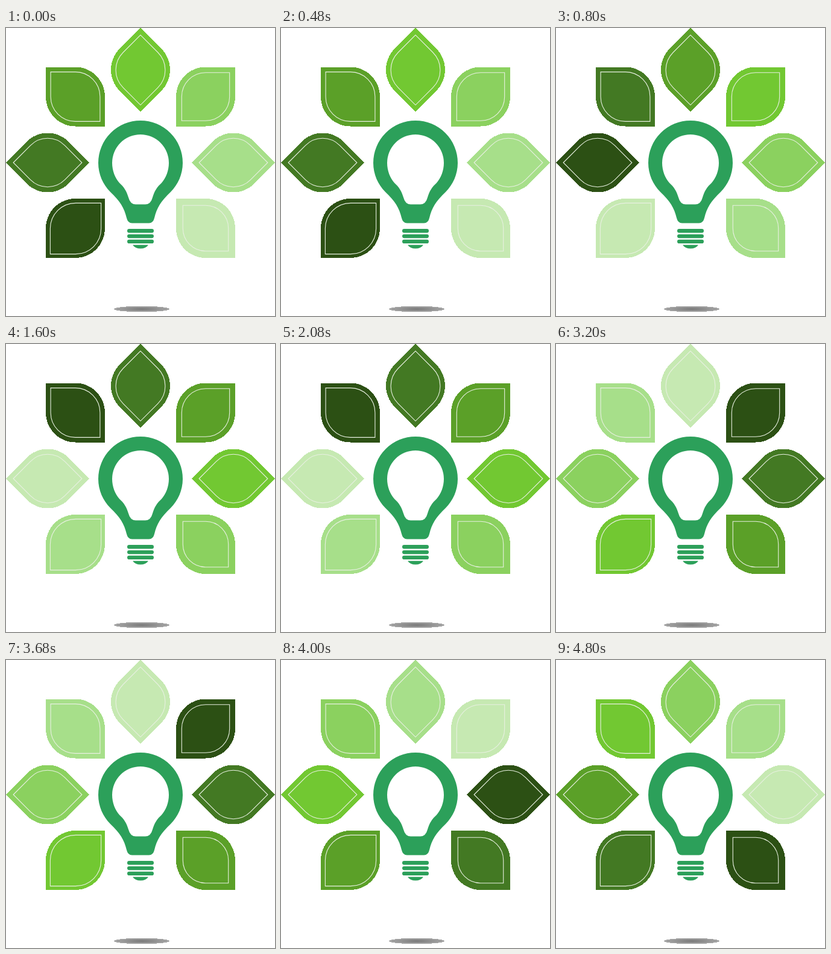
An HTML page without scripts for the animation above (5600 ms loop, 446x476 px).

```html
<!DOCTYPE html>
<html lang="en">
<head>
<meta charset="utf-8">
<title>Leaf bulb</title>
<style>
  html, body { margin: 0; width: 100%; height: 100%; overflow: hidden; background: #fff; }
  svg { display: block; width: 446px; height: 476px; }

  /* Each leaf runs the same colour cycle, one step behind its neighbour. */
  .leaf {
    animation: shade 5.6s step-end infinite;
    animation-delay: calc((var(--i) - 7) * .8s);
    shape-rendering: crispEdges;
  }
  .vein {
    fill: none;
    stroke: #e8f0e1;
    stroke-width: 1.1px;
    shape-rendering: auto;
  }
  #leaf { vector-effect: non-scaling-stroke; }
  .bulb { fill: #2ca05a; }

  @keyframes shade {
    0%, 100% { fill: #2c5014; }
    14.2857% { fill: #c6e9b2; }
    28.5714% { fill: #a7df8a; }
    42.8571% { fill: #8bd15f; }
    57.1428% { fill: #72c832; }
    71.4285% { fill: #5ba028; }
    85.7142% { fill: #437923; }
  }
</style>
</head>
<body>
<svg viewBox="0 0 446 476">
  <defs>
    <path id="leaf" d="M-49-49H0A49 49 0 0 1 49 0V49H0A49 49 0 0 1-49 0Z"/>
    <radialGradient id="shadow">
      <stop offset="0" stop-color="#777"/>
      <stop offset="1" stop-color="#a6a6a6"/>
    </radialGradient>
  </defs>

  <!-- Leaves, clockwise from bottom left -->
  <g class="leaf" style="--i:0" transform="translate(115 331) rotate(90)">
    <use href="#leaf"/>
    <use href="#leaf" class="vein" transform="translate(.5 -.5) scale(.86)"/>
  </g>
  <g class="leaf" style="--i:1" transform="translate(69 222.5) rotate(-45)">
    <use href="#leaf"/>
    <use href="#leaf" class="vein" transform="scale(.82)"/>
  </g>
  <g class="leaf" style="--i:2" transform="translate(115 113.5)">
    <use href="#leaf"/>
    <use href="#leaf" class="vein" transform="scale(.835)"/>
  </g>
  <g class="leaf" style="--i:3" transform="translate(223 69) rotate(45)">
    <use href="#leaf"/>
    <use href="#leaf" class="vein" transform="translate(.3 .3) scale(.835)"/>
  </g>
  <g class="leaf" style="--i:4" transform="translate(331 113.5) rotate(90)">
    <use href="#leaf"/>
    <use href="#leaf" class="vein" transform="scale(.81)"/>
  </g>
  <g class="leaf" style="--i:5" transform="translate(377 222.5) rotate(-45)">
    <use href="#leaf"/>
    <use href="#leaf" class="vein" transform="scale(.82)"/>
  </g>
  <g class="leaf" style="--i:6" transform="translate(331 331)">
    <use href="#leaf"/>
    <use href="#leaf" class="vein" transform="scale(.77)"/>
  </g>

  <g class="bulb">
    <path fill-rule="evenodd" d="
      M223 153A70 70 0 0 1 293 223C293 242 285 259 273 271C257 286 250 297 246 314Q244 322.5 237 322.5
      H209Q202 322.5 200 314C196 297 189 286 173 271C161 259 153 242 153 223A70 70 0 0 1 223 153Z
      M223 176A47 47 0 0 1 270 223C270 236 265 248 258 256C250 263 246 270 243 280Q240 291.5 231 291.5
      H215Q206 291.5 203 280C200 270 196 263 188 256C181 248 176 236 176 223A47 47 0 0 1 223 176Z"/>
    <rect x="201" y="332" width="44" height="6.4" rx="3.2"/>
    <rect x="201" y="341" width="44" height="6.2" rx="3.1"/>
    <rect x="201" y="349.8" width="44" height="6.2" rx="3.1"/>
    <path d="M210 358.5H236Q232 364.5 223 364.5T210 358.5Z"/>
  </g>

  <ellipse cx="225" cy="464.5" rx="46" ry="4.8" fill="url(#shadow)" shape-rendering="crispEdges"/>
</svg>
</body>
</html>
```
